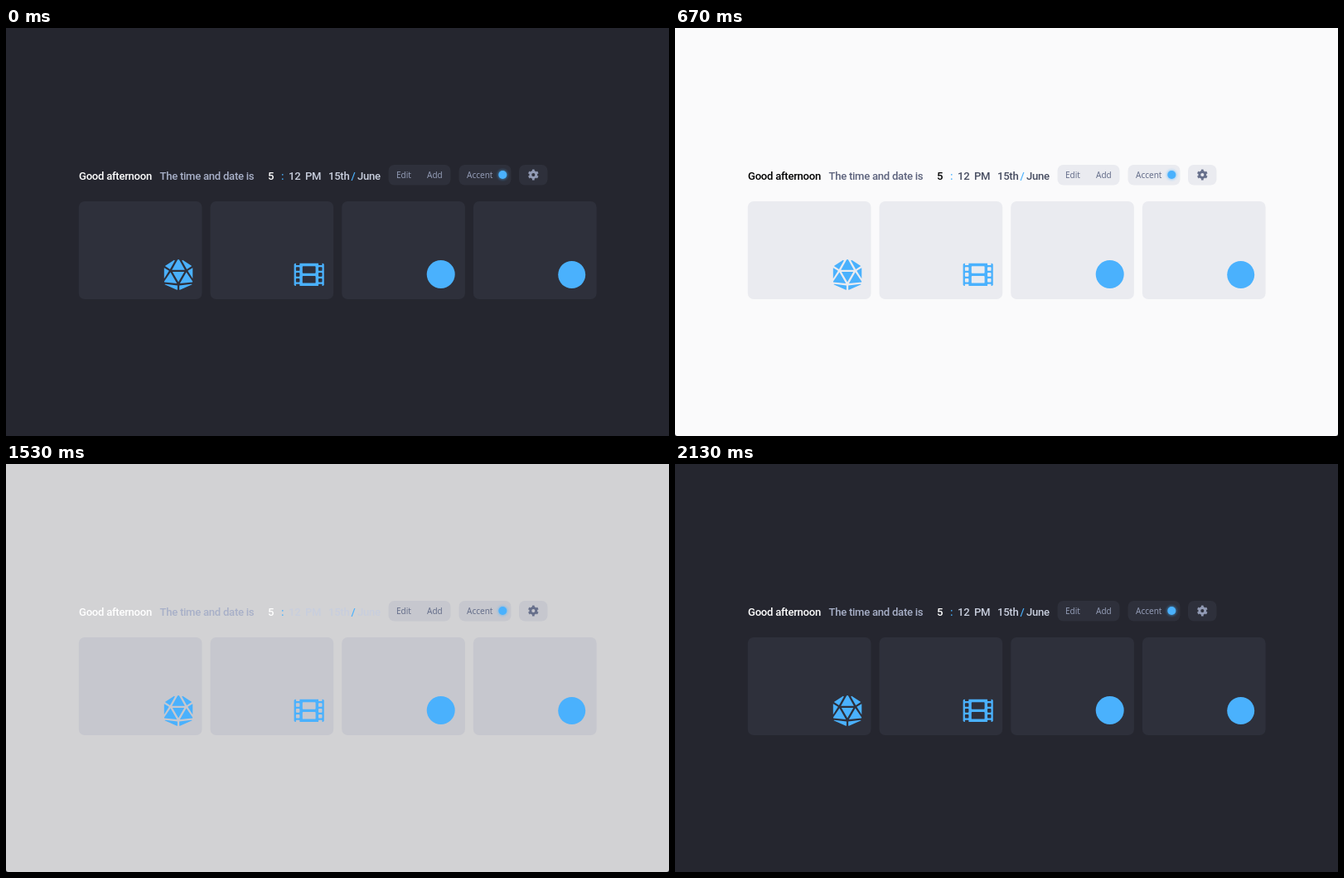
An HTML page that plays this animation: 800x492 px, repeating every 2190 ms.

```html
<!DOCTYPE html>
<html lang="en">
<head>
<meta charset="utf-8">
<title>Start page theme switch</title>
<style>
html, body { margin: 0; width: 100%; height: 100%; overflow: hidden; background: #24262e; }
svg { display: block; width: 800px; height: 492px; background: var(--page); border-radius: 0 0 3px 3px; }
.panel { fill: var(--panel); }
.accent { fill: #4ab1fd; }
.strong { fill: var(--strong); }
.muted { fill: var(--muted); }
.date { fill: var(--date); }
.label { fill: var(--label); font: 10px "Noto Sans", "Open Sans", sans-serif; }
.gear { fill: none; stroke: var(--label); }
#head { font: 500 17px Roboto, "Open Sans", sans-serif; font-stretch: 75%; letter-spacing: -.02em; }
</style>
</head>
<body>
<svg viewBox="0 0 800 492">
  <defs>
    <filter id="blur" x="-1" y="-1" width="3" height="3"><feGaussianBlur stdDeviation="1.6"/></filter>
    <path id="half" d="M107 215L0 373 4 383 215 405ZM0 325L83 193 0 144ZM9 420L213 511Q224 512 224 504V438L18 415Z
      M99 166L181 20 169 12 14 113ZM241 0Q231 0 226 8L131 176H241ZM241 208H140L241 384Z"/>
  </defs>

  <g id="head">
    <text class="strong" id="greeting" x="88" y="183">Good afternoon</text>
    <text class="muted" x="185.5" y="183">The time and date is</text>
    <text class="strong" x="316" y="183">5</text>
    <text class="accent" x="332" y="183">:</text>
    <text class="date" x="341" y="183">12</text>
    <text class="date" x="361" y="183">PM</text>
    <text class="date" x="389" y="183">15th</text>
    <text class="accent" x="416.5" y="183">/</text>
    <text class="date" x="424" y="183">June</text>
  </g>

  <g class="panel">
    <rect x="461.5" y="165" width="75" height="24.5" rx="7"/>
    <rect x="546.5" y="165" width="63" height="24.5" rx="7"/>
    <rect x="619" y="165" width="34.5" height="24.5" rx="7"/>
  </g>
  <g class="label">
    <text x="471" y="181">Edit</text>
    <text x="508" y="181">Add</text>
    <text x="556" y="181">Accent</text>
  </g>
  <circle class="accent" cx="599.3" cy="177" r="6" opacity=".5" filter="url(#blur)"/>
  <circle class="accent" cx="599.3" cy="177" r="5"/>
  <g class="gear" transform="translate(636.3 177)">
    <circle r="3.5" stroke-width="2.9"/>
    <circle r="5.4" stroke-width="2" pathLength="12" stroke-dasharray="1 1" stroke-dashoffset="-.5"/>
  </g>

  <g class="panel" id="cards"></g>

  <g class="accent" transform="translate(190.8 279) scale(.0718)">
    <use href="#half"/>
    <use href="#half" transform="translate(480) scale(-1 1)"/>
  </g>
  <g transform="translate(347.6 279.3) scale(.0706)">
    <rect class="accent" y="64" width="512" height="384" rx="24"/>
    <g class="panel" id="holes">
      <rect x="144" y="112" width="224" height="120" rx="12"/>
      <rect x="144" y="280" width="224" height="120" rx="12"/>
    </g>
  </g>
  <circle class="accent" cx="524.7" cy="297" r="17"/>
  <circle class="accent" cx="682.7" cy="297.5" r="16.5"/>
</svg>
<script>
const LOOP = 2190, STEP = 200 / 3, FADE = 219, TO_LIGHT = 279, TO_DARK = 1500, LABEL_DELAY = 40;
const $ = id => document.getElementById(id);

function addRect(parent, x, y, width, height, rx) {
  const rect = document.createElementNS("http://www.w3.org/2000/svg", "rect");
  Object.entries({ x, y, width, height, rx }).forEach(([k, v]) => rect.setAttribute(k, v));
  parent.append(rect);
}
for (let i = 0; i < 4; i++) addRect($("cards"), 87.8 + 158.7 * i, 209, 148.7, 118, 7);
for (const x of [32, 416])
  for (let i = 0; i < 5; i++) addRect($("holes"), x, 32 + 96 * i, 64, 64, 12);

// Smaller type when no condensed face is available
const room = 88 / $("greeting").getComputedTextLength();
$("head").style.fontSize = Math.min(17.5, 17 * room) + "px";

// dark and light value of each colour
const colors = {
  page: [[37, 38, 47], [250, 250, 251]],
  panel: [[46, 48, 59], [234, 235, 240]],
  label: [[146, 155, 181], [102, 111, 139]],
  strong: [[255, 255, 255], [0, 0, 0]],
  muted: [[168, 176, 200], [92, 98, 124]],
  date: [[200, 206, 221], [71, 77, 97]]
};

// cubic-bezier(.25, .1, .25, 1)
function ease(x) {
  if (x <= 0) return 0;
  if (x >= 1) return 1;
  const curve = (u, a, b) => 3 * a * u * (1 - u) ** 2 + 3 * b * u * u * (1 - u) + u ** 3;
  let lo = 0, hi = 1;
  for (let i = 0; i < 20; i++) {
    const mid = (lo + hi) / 2;
    if (curve(mid, .25, .25) < x) lo = mid; else hi = mid;
  }
  return curve(lo, .1, 1);
}

const lightness = t => ease((t - TO_LIGHT) / FADE) - ease((t - TO_DARK) / FADE);

function draw(now) {
  const t = Math.floor((now % LOOP + 4) / STEP) * STEP % 2200;
  const instant = t >= TO_LIGHT && t < TO_DARK ? 1 : 0;
  const fade = lightness(t);
  const amount = { page: fade, panel: fade, label: lightness(t - LABEL_DELAY) };
  for (const [name, [dark, light]] of Object.entries(colors)) {
    const p = amount[name] ?? instant;
    const rgb = dark.map((c, i) => Math.round(c + (light[i] - c) * p));
    document.documentElement.style.setProperty("--" + name, `rgb(${rgb})`);
  }
}

function tick() {
  draw(performance.now());
  requestAnimationFrame(tick);
}
tick();
</script>
</body>
</html>
```
